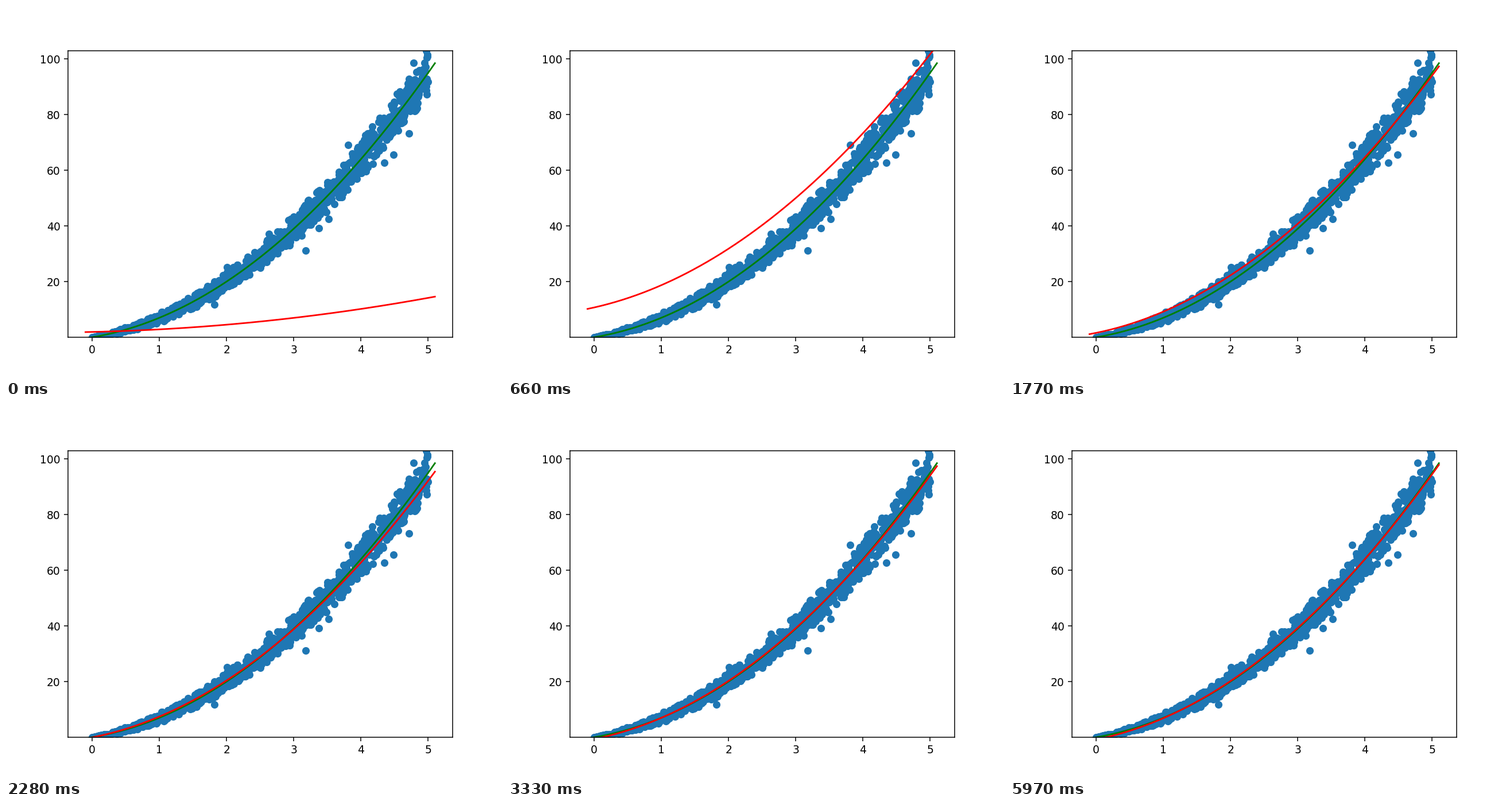
A matplotlib script for the animation above (6000 ms loop, 864 px wide and 648 px high).

```python
import numpy as np
import matplotlib.pyplot as plt
from matplotlib.animation import FuncAnimation

FRAMES, INTERVAL = 200, 30
TRUTH = [3, 4, 0]

# The few points that stand clear of the cloud
STRAYS = np.array([
    (4.97, 102.9), (4.78, 98.5), (3.81, 69.1), (2.63, 37.1), (2.01, 25.2),
    (4.71, 73.2), (4.48, 65.6), (4.35, 62.6), (3.52, 42.4), (3.37, 39.2),
    (3.18, 31.2), (1.82, 11.8),
])


def make_cloud(n=1000, limit=1.7):
    """Quadratic data whose noise grows with x."""
    rng = np.random.default_rng(4)
    x = rng.uniform(0, 5, n)
    noise = rng.normal(size=2 * n)
    noise = noise[np.abs(noise) < limit][:n]
    y = np.polyval(TRUTH, x) + noise * x
    return np.append(x, STRAYS[:, 0]), np.append(y, STRAYS[:, 1])


# Fitted curve, described by its heights at three knots.
# Momentum descent: a ringing fast mode plus a critically damped slow one.
KNOTS = np.array([-0.1, 2.0, 5.1])
FINAL = np.array([-1.25, 20.2, 97.85])
FAST = np.array([12.7, 25.5, 68.3])
SLOW = np.array([15.8, 9.8, -15.0])
DRIFT = np.array([0.472, 0.303, -0.81])
DECAY = np.sqrt(0.9)
OMEGA, PHASE = 0.173, -0.03


def fit_at(step):
    ring = FAST * np.cos(OMEGA * step + PHASE)
    heights = FINAL + DECAY**step * (SLOW + DRIFT * step - ring)
    return np.linalg.solve(np.vander(KNOTS, 3), heights)


fig, ax = plt.subplots(figsize=(6.4, 4.8), dpi=135)
ax.plot(*make_cloud(), "o", color="C0")
xs = np.linspace(-0.1, 5.1, 150)
ax.plot(xs, np.polyval(TRUTH, xs), color="g")
red, = ax.plot(xs, np.polyval(fit_at(0), xs), color="r")
ax.set_xlim(-0.36, 5.36)
ax.set_ylim(0.06, 102.94)


def update(step):
    red.set_ydata(np.polyval(fit_at(step), xs))
    return red,


anim = FuncAnimation(fig, update, frames=FRAMES, interval=INTERVAL,
                     repeat=True, repeat_delay=0)
plt.show()
```
